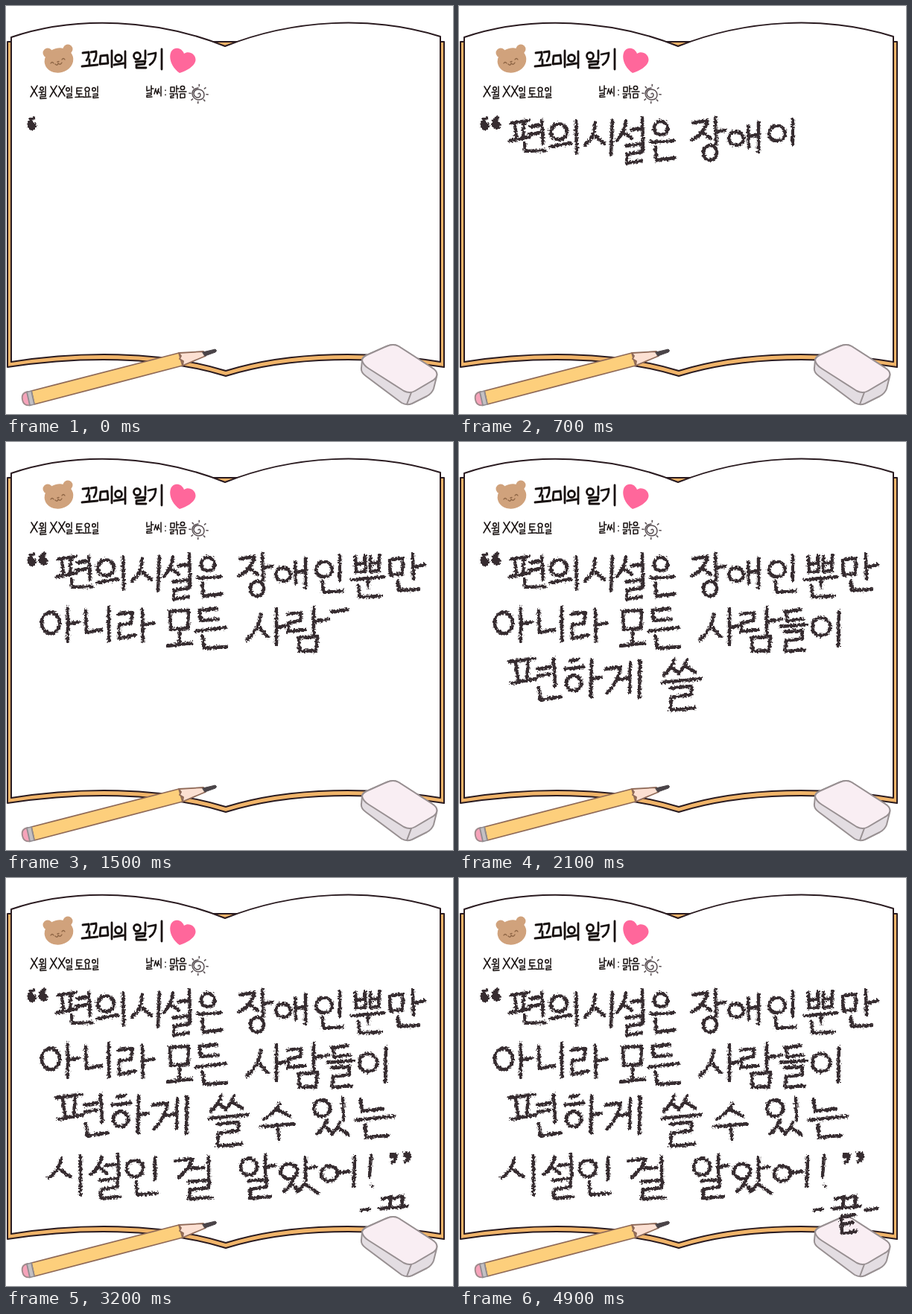
Write an HTML page that moves like this. It is 600 px wide and 548 px high and loops after 5 s.

```html
<!DOCTYPE html>
<html lang="ko">
<head>
<meta charset="utf-8">
<title>꼬미의 일기</title>
<style>
  html, body { margin: 0; width: 100%; height: 100%; overflow: hidden; background: #fff; }
  svg { display: block; width: 600px; height: 548px; }
  path, ellipse, circle { stroke-linecap: round; stroke-linejoin: round; }
  .line { fill: none; stroke: #2a1b20; stroke-width: 2; }
  .label { fill: none; stroke: #17100f; stroke-width: 1.5; }
  .title { stroke-width: 2.8; }
  .ink { fill: none; stroke: #362c30; stroke-width: 4.5; filter: url(#rough); }
</style>
</head>
<body>
<svg viewBox="0 0 600 548">
  <defs>
    <filter id="rough" filterUnits="userSpaceOnUse" x="0" y="0" width="600" height="548" color-interpolation-filters="sRGB">
      <feTurbulence type="fractalNoise" baseFrequency=".38" numOctaves="2" seed="4"/>
      <feDisplacementMap in="SourceGraphic" scale="6" xChannelSelector="R" yChannelSelector="G"/>
    </filter>
  </defs>

  <!-- book -->
  <path class="line" style="fill:#f0b469" d="M7 48H2V485C95 471 205 469 295 497C385 469 495 471 588 485V48H583Z"/>
  <path class="line" style="fill:#fff" d="M7 42C95 12 205 18 294 54C385 18 490 12 583 41V478C495 464 385 462 295 490C205 462 95 464 7 478Z"/>

  <!-- bear -->
  <g fill="#d0a27c">
    <circle cx="56" cy="63" r="6.5"/>
    <circle cx="83" cy="58" r="6.5"/>
    <ellipse cx="71" cy="73" rx="19.5" ry="16.5" transform="rotate(-14 71 73)"/>
    <path fill="none" stroke="#8d6444" stroke-width="1.3" d="M60 77q2-3 4 0M75 72q2-3 4 0M66 78q3 3 4-1q3 3 5-1M69 75l2-.5"/>
  </g>

  <!-- heart -->
  <path fill="#ff679b" d="M233 90C224 84 218 72 221 63C224 54 236 55 239 64C246 59 257 66 254 75C252 81 243 87 233 90Z"/>

  <!-- sun -->
  <g fill="none" stroke="#5a5054" stroke-width="1.5">
    <path d="M258 118q2-2 3 1q0 4-4 4q-5-1-5-6q1-5 6-5q7 0 8 7q0 7-8 7q-7-1-8-8q0-7 8-8"/>
    <circle cx="258.500" cy="118" r="11.500" pathLength="72" style="stroke-width:3.4;stroke-linecap:butt;stroke-dasharray:1.6 7.4"/>
  </g>

  <g class="label title" aria-label="꼬미의 일기">
    <g data-pen="M103 63 111 62Q112 68 108 73M114 62 121 61Q122 68 118 74M112 72 112 79M102 81 123 79"/>
    <g data-pen="M127 67 126 78 137 77 136 66ZM142 60 142 82O151 70 4.500 4.500M145 79 158 77M160 61 160 83"/>
    <g data-pen="O176 67 4.500 4.500M187 60 187 71M174 75 187 74 186 78 175 79 175 83 188 83M191 65 201 63Q201 74 193 79M209 58 209 85"/>
  </g>

  <g class="label" aria-label="X월 XX일 토요일">
    <g data-pen="M34 108 42 121M42 107 33 122O48 111 2.300 2.300M44 116 51 115M48 116 48 118M53 108 53 118M46 119.500 53 119 53 121.500 46 122 46 124.500 54 124"/>
    <g data-pen="M60 108 68 121M68 107 59 122M71 108 79 121M79 107 70 122O83 112 2.300 2.300M88 108 88 116M82 118.500 88 118 88 120.500 82 121 82 123.500 89 123"/>
    <g data-pen="M102 110 95 110 95 118 102 118M95 114 101 114M98 118 98 122M93 122.500 104 122O109 112 3 2.800M107 116 107 121M111 116 111 121M104 122.500 114 122"/>
    <g data-pen="O118 112 2.300 2.300M123 108 123 116M117 118.500 123 118 123 120.500 117 121 117 123.500 124 123"/>
  </g>

  <g class="label" aria-label="날씨 : 맑음">
    <g data-pen="M189 108 189 114 193 113M195 107 195 116M195 111 198 111M189 117.500 195 117 195 119.500 189 120 189 122.500 196 122"/>
    <g data-pen="M201 111 199 118M201 113 203 118M205 111 203 118M204 113 206 117M208 108 208 121M214 113 214 113.500M214 119 214 119.500"/>
    <g data-pen="M221 109 221 115 226 115 226 109ZM229 107 229 116M229 111 232 111M220 118 225 118 225 120.500 221 121 221 123.500 225 123M227 118 230 118 230 124"/>
    <g data-pen="O237 110 2.700 2.500M232 115 242 115M234 118 234 123.500 240 123 240 118Z"/>
  </g>

  <!-- pencil -->
  <g stroke="#8f6a58" stroke-width="1.8">
    <path fill="#fdcf7c" d="M34 517 232 466 237 483 38 535Z"/>
    <path fill="#fce0d2" d="M232 466 265 464 268 470 237 483 238 477 233 474 235 470Z"/>
    <path fill="#f6a3ba" stroke="#a08a8c" d="M29 518Q20 520 22 529Q24 538 33 536Z"/>
    <path fill="#c3c0c4" stroke="#928c90" d="M28 518.500 34 517 38 535 32 536.500Z"/>
    <path fill="#4a4448" stroke="#4a4448" stroke-width="1" d="M264 465 281 461Q284 463 281 465L267 470Z"/>
  </g>

  <!-- eraser -->
  <g stroke="#989092" stroke-width="2">
    <path fill="#e3dde2" d="M478 476Q478 472 484 469L511 457Q520 453 527 457L572 486Q580 491 578 498L574 514Q572 520 565 524L545 534Q538 537 531 533L483 497Q476 492 477 486Z"/>
    <path fill="#f9eef3" d="M478 476Q478 472 484 469L511 457Q520 453 527 457L572 486Q580 491 578 497Q577 501 571 504L549 517Q542 521 534 517L487 487Q479 482 478 476Z"/>
    <path fill="none" d="M544 519 538 535"/>
  </g>

  <!-- handwriting: data-at is the time in ms a word begins -->
  <g class="ink">
    <g data-at="0" aria-label="“" data-pen="M37 151Q31 153 31 159Q32 166 37 164Q41 160 36 157Q32 160 35 162M52 150Q46 152 46 158Q47 165 52 163Q56 159 51 156Q47 159 50 161"/>
    <g data-at="100" aria-label="편의시설은" data-pen="M70 157 93 154M75 159 77 178M87 157 86 176M68 181 95 176M96 162 109 160M95 172 109 170M111 153 113 185M88 184 89 195 116 194 O134 169 11 10.500M122 189 150 184M157 154 158 198 M183 157Q182 176 169 187M181 173 195 185M206 154 204 199 M224 155Q222 171 212 180M222 170 232 178M231 166 244 165M246 151 247 182M224 188 247 185 246 196 226 199 225 211 245 208 O271 164 9 9M257 183 288 181M264 189 265 207 290 204"/>
    <g data-at="507" aria-label="장애인" data-pen="M314 157 334 154Q328 172 313 180M326 169 338 178M344 151 345 186M346 169 357 167O337 197 9 10 O372 178 10 9M388 161 389 190M389 175 402 173M402 156 402 196 O427 171 11 10M448 153 448 186M425 187 426 202 452 200"/>
    <g data-at="729" aria-label="뿐만" data-pen="M469 154 470 174M482 153 482 174M470 164 481 163M470 175 482 174M489 153 489 173M501 152 500 173M489 163 500 162M489 174 501 173M464 185 507 181M486 184 486 195M473 193 475 208 503 207 M515 158 516 178M515 158 533 156 532 176M516 179 532 177M546 150 547 184M548 168 562 165M526 186 527 199 554 198"/>
    <g data-at="1030" aria-label="아니라" data-pen="O60 243 12 14M83 223 83 267M84 244 98 242 M107 226 108 256 128 252M138 222 138 267 M151 231 169 229 168 243 152 246 152 264 173 259M183 225 184 268M185 246 199 243"/>
    <g data-at="1171" aria-label="모든" data-pen="M220 227 221 251M221 227 245 226 244 250M222 252 244 250M233 252 233 270M217 274 249 270 M283 224 260 226 261 240 285 238M255 254 295 249M264 260 266 277 296 275"/>
    <g data-at="1313" aria-label="사람들이" data-pen="M342 231Q340 252 323 266M339 249 352 262M363 224 363 272M364 249 375 247 M378 231 396 229 395 240 379 243 379 255 401 252M413 222 413 258M415 241 433 238M393 263 394 281M393 263 418 261 416 280M394 281 416 280 M437 228 459 225M439 229 440 240 462 238M431 248 467 245M437 255 461 253 461 264 439 267 438 281 464 279 O486 248 12 12M510 228 509 274"/>
    <g data-at="1596" aria-label="편하게" data-pen="M67 295 102 291M76 297 79 318M93 296 91 317M70 324 104 318M105 305 122 302M106 314 122 312M127 291 129 328M107 329 109 346 137 342 M149 294 160 292M142 305 167 302O154 324 10 10M178 292 177 342M179 318 191 316 M197 305 217 302Q214 322 199 337M215 319 227 317M230 296 229 336M243 294 242 343"/>
    <g data-at="1976" aria-label="쓸" data-pen="M289 292Q286 303 275 313M286 303 296 311M306 292Q303 303 294 311M304 301 317 309M272 323 325 318M283 331 312 328 312 339 285 343 284 360 317 357"/>
    <g data-at="2110" aria-label="수 있는" data-pen="M367 303Q361 315 346 324M364 311 381 320M342 334 387 330M365 333 366 352 O424 309 11 11M452 296 453 325M431 325Q428 335 417 344M429 334 437 342M448 328Q445 338 437 344M446 335 460 345 M476 297 478 313 506 310M470 325 521 320M482 331 483 348 514 346"/>
    <g data-at="2396" aria-label="시설인" data-pen="M74 377Q72 393 57 403M71 391 86 401M100 373 100 425 M128 375Q125 390 114 398M125 388 135 396M133 386 147 385M150 371 151 401M126 406 150 404 149 415 128 418 127 430 153 428 O173 390 11 11M200 375 200 405M175 408 176 425 204 423"/>
    <g data-at="2638" aria-label="걸" data-pen="M227 380 250 377Q247 391 231 402M249 390 265 389M272 374 272 403M245 408 273 406 272 416 247 419 246 431 277 429"/>
    <g data-at="2726" aria-label="알았어!" data-pen="O326 388 11 11M348 372 348 403M349 388 361 386M326 407 350 405 349 415 328 418 327 430 354 428 O380 394 11 10M402 375 402 403M404 390 416 388M386 404Q383 413 373 421M384 412 393 420M403 405Q400 414 391 421M401 411 419 423 O434 397 11 10M447 396 461 394M468 374 467 414 M490 373 488 401M491 413 492 414"/>
    <g data-at="3078" aria-label="”" data-pen="M521 372Q516 369 517 374Q523 376 523 371Q525 378 518 382M539 371Q534 368 535 373Q541 375 541 370Q543 377 536 381"/>
    <g data-at="3122" aria-label="- 끝 -" data-pen="M477 446 488 445M505 431 517 428 515 442M521 430 533 427 531 441M502 444 538 441M513 455 532 452M514 465 529 463M513 455 514 477 533 475M546 446 561 444"/>
  </g>
</svg>
<script>
  const LOOP = 5000, STEP = 100, END = 3298;
  const NS = 'http://www.w3.org/2000/svg';
  const strokes = [];

  function addStroke(parent, code) {
    const oval = code[0] === 'O';
    const el = document.createElementNS(NS, oval ? 'ellipse' : 'path');
    if (oval) {
      const nums = code.slice(1).trim().split(/\s+/);
      ['cx', 'cy', 'rx', 'ry'].forEach((name, i) => el.setAttribute(name, nums[i]));
    } else {
      el.setAttribute('d', code);
    }
    parent.append(el);
    return el;
  }

  const words = [...document.querySelectorAll('[data-at]')];

  for (const g of document.querySelectorAll('[data-pen]')) {
    const els = g.dataset.pen.match(/[MO][^MO]*/g).map(code => addStroke(g, code));
    const i = words.indexOf(g);
    if (i < 0) continue;
    const start = +g.dataset.at;
    const end = i + 1 < words.length ? +words[i + 1].dataset.at : END;
    els.forEach((el, k) => strokes.push({ el, at: start + (end - start) * k / els.length }));
  }

  let shown = -1;
  function draw() {
    const t = Math.floor(performance.now() % LOOP / STEP) * STEP;
    if (t !== shown) {
      shown = t;
      for (const s of strokes) s.el.style.visibility = s.at <= t ? 'visible' : 'hidden';
    }
    requestAnimationFrame(draw);
  }
  draw();
</script>
</body>
</html>
```
